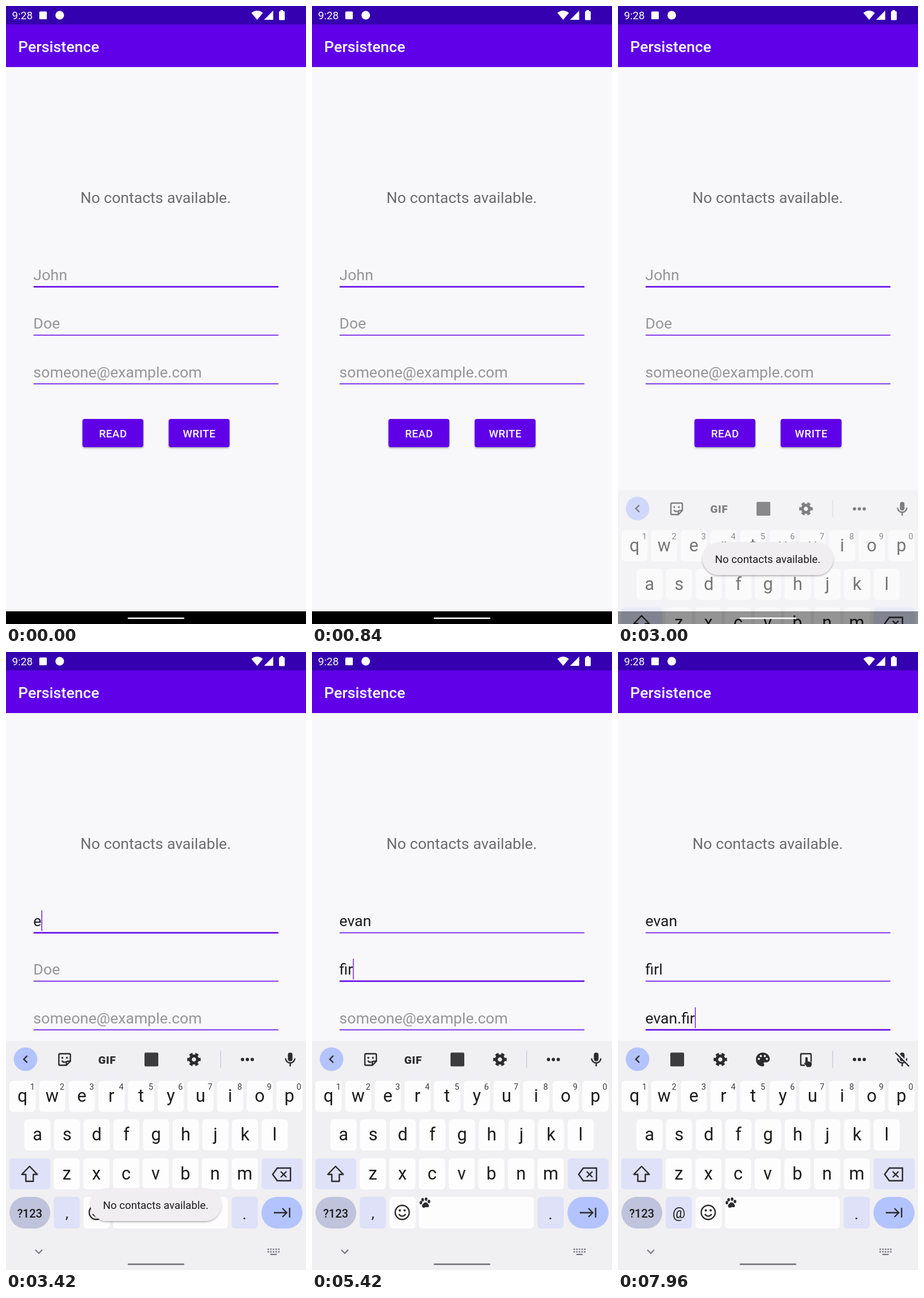
An HTML page that plays this animation: 522x1073 px, repeating every 8 s.

```html
<!DOCTYPE html>
<html lang="en">
<head>
<meta charset="utf-8">
<title>Contact form</title>
<style>
html, body { margin: 0; width: 100%; height: 100%; overflow: hidden; background: #f8f8fa; }
svg { display: block; width: 100%; height: 100%; font-family: Roboto, sans-serif; }
.ink { fill: none; stroke: #2b2b2e; stroke-width: 2.4; }
.solid { fill: #2b2b2e; }
</style>
</head>
<body>
<script>
const PURPLE = '#5f00e8', DARK = '#1b1b1d', KEY = '#fdfdfd', FUNC = '#dee1f8', BLUE = '#b3c3fd';
const HANDLE = 'M213 1063H309';

const rect = (x, y, w, h, r, fill, extra = '') =>
  `<rect x="${x}" y="${y}" width="${w}" height="${h}" rx="${r}" fill="${fill}" ${extra}/>`;
const circle = (x, y, r, fill) => `<circle cx="${x}" cy="${y}" r="${r}" fill="${fill}"/>`;
const text = (x, y, size, fill, str, extra = '') =>
  `<text x="${x}" y="${y}" font-size="${size}" fill="${fill}" ${extra}>${str}</text>`;
const mid = (x, y, size, fill, str, extra = '') =>
  text(x, y, size, fill, str, 'text-anchor="middle" ' + extra);
const ink = (d, extra = '') => `<path class="ink" d="${d}" ${extra}/>`;
const solid = (d, extra = '') => `<path class="solid" d="${d}" ${extra}/>`;
const at = (x, y, body) => `<g transform="translate(${x} ${y})">${body}</g>`;

// Form
const fields = [
  { y: 487.5, hint: 'John', value: 'evan', start: 3420, step: 190 },
  { y: 571.5, hint: 'Doe', value: 'firl', start: 4850, step: 220 },
  { y: 656, hint: 'someone@example.com', value: 'evan.firl', start: 6560, step: 190 }
];
const focusTimes = [0, 4300, 6050];

const button = (x, label, id) =>
  rect(x, 717, 106, 49, 4, PURPLE, 'filter="url(#low)"') +
  rect(x, 717, 106, 49, 4, '#000', `id="${id}" opacity="0"`) +
  mid(x + 53.3, 748.6, 18.6, '#fff', label, 'font-weight="500" letter-spacing=".45"');

const statusBar =
  rect(0, 0, 522, 32, 0, '#3500b0') +
  text(10.5, 23, 18.6, '#fff', '9:28') +
  rect(58, 9.5, 13, 13.5, 1.5, '#fff') + circle(93.5, 16, 7.5, '#fff') +
  `<path fill="#fff" d="M427 12Q437 4 447 12L437 24ZM449 24L465 8V24Z
    M475 10.500Q475 9 476.500 9H477.500V7H482V9H483.500Q485 9 485 10.500V23Q485 24.500 483.500 24.500H476.500Q475 24.500 475 23Z"/>`;

const form =
  rect(0, 32, 522, 74, 0, PURPLE) +
  text(21.3, 80, 26.6, '#fff', 'Persistence', 'font-weight="500"') +
  mid(260.5, 342.3, 26.6, '#6c6c6e', 'No contacts available.') +
  fields.map((f, i) =>
    text(47.6, f.y - 11.3, 26.5, '#959597', f.hint, `id="text${i}"`) +
    `<path id="line${i}" d="M48 ${f.y}H474" stroke="${PURPLE}"/>`).join('') +
  rect(0, 0, 1.3, 36, 0, PURPLE, 'id="caret"') +
  button(133, 'READ', 'press') + button(283, 'WRITE', 'idle');

// Keyboard icons, drawn around their own centre
const block = rect(-12, -12, 24, 24, 2, '#3c3c3f');
const gear =
  `<circle class="ink" r="6.200" stroke-width="5" style="stroke-width:5"/>
   <circle class="ink" r="9.500" pathLength="12" stroke-dasharray="1.100 .900" stroke-dashoffset=".550" style="stroke-width:4.500"/>`;
const mic = solid('M-4 -8A4 4 0 0 1 4 -8V-1A4 4 0 0 1 -4 -1Z') + ink('M-8 -2A8 8 0 0 0 8 -2M0 6V12');
const sticker =
  ink('M10 3V-8Q10 -10 8 -10H-8Q-10 -10 -10 -8V8Q-10 10 -8 10H3ZM3 10V5Q3 3 5 3H10M-5 2Q-2 6 2 4') +
  circle(-4, -3, 1.7, '#2b2b2e') + circle(4, -3, 1.7, '#2b2b2e');
const palette =
  solid('M0 -12C7 -12 12 -7 12 -1C12 3 9 5 5 5H3C1 5 1 7 2 8C3 10 2 12 0 12C-7 12 -12 7 -12 0C-12 -7 -7 -12 0 -12Z') +
  [[-7, -1], [-3.5, -6], [3.5, -6], [7, -1]].map(([x, y]) => circle(x, y, 1.9, '#f0eff2')).join('');
const touch =
  ink('M-2 10H-8Q-9 10 -9 8V-8Q-9 -10 -8 -10H8Q9 -10 9 -8V4') +
  solid('M-1 -3Q1 -5 3 -3V3L10 5V10L8 13H2L-4 6L-1 6Z');
const dots = [-8.5, 0, 8.5].map(x => circle(x, 0, 2.9, '#2b2b2e')).join('');

const tools = list => list.map(([x, icon]) => at(x, 707.5, icon)).join('');
const nameTools = tools([
  [102, sticker],
  [176, mid(0, 7, 19, '#2b2b2e', 'GIF', 'font-weight="900" letter-spacing=".6"')],
  [253, block], [327, gear], [494.5, mic]
]);
const mailTools = tools([
  [103, block], [178, gear], [252, palette], [327, touch],
  [494.5, mic + `<path d="M-10 -13L13 10" stroke="#f0eff2" stroke-width="3"/>` + ink('M-12 -12L12 12')]
]);

const letters = (row, x0, y) => [...row].map((c, i) => {
  const x = x0 + i * 51.6;
  return rect(x, y, 45.5, 54, 6, KEY) + mid(x + 22.7, y + 36.5, 30.5, DARK, c);
}).join('');

const paw = solid('M0 0Q4 -2 7 3Q10 8 5 8Q2 7 0 9Q-5 9 -4 4Z') +
  [[-6, 0], [-3, -5], [3, -6], [8, -2]].map(([x, y]) =>
    `<ellipse class="solid" cx="${x}" cy="${y}" rx="2.300" ry="3"/>`).join('');
const smiley =
  '<circle class="ink" r="12.200"/>' + ink('M-6 3Q0 10 6 3') +
  circle(-4.2, -3.5, 2, '#2b2b2e') + circle(4.2, -3.5, 2, '#2b2b2e');

const keyboard =
  rect(0, 675, 522, 398, 0, '#f0eff2') +
  circle(34, 707, 20.5, BLUE) + ink('M37 701L31 707L37 713') +
  `<g id="nameTools">${nameTools}</g><g id="mailTools">${mailTools}</g>` +
  '<path d="M373.500 692V722" stroke="#cbcbd0" stroke-width="1.300"/>' + at(420, 707.5, dots) +
  letters('qwertyuiop', 6, 744.5) +
  [...'1234567890'].map((d, i) => mid(46 + i * 51.5, 760, 14.5, '#3d3d40', d)).join('') +
  letters('asdfghjkl', 32, 811.5) +
  letters('zxcvbnm', 83, 879) +
  rect(6, 879, 71, 54, 6, FUNC) +
  ink('M41 893L27.500 907H34.500V919H47.500V907H54.500Z', 'stroke-linejoin="round"') +
  rect(445, 879, 71, 54, 6, FUNC) +
  ink('M464 907L472 896H495V918H472ZM478 902L488 912M488 902L478 912') +
  rect(6, 946, 71, 55, 27.5, '#bfc3db') +
  mid(41.3, 981.5, 20, DARK, '?123', 'font-weight="500"') +
  rect(83, 946, 45.5, 55, 6, FUNC) + mid(106, 983, 25, DARK, ',', 'id="extra"') +
  rect(135, 946, 45.5, 55, 6, KEY) + at(157, 973, smiley) +
  rect(186, 946, 200, 55, 6, KEY) + at(195.5, 956, paw) +
  rect(392.5, 946, 45.5, 55, 6, FUNC) + mid(415, 985, 28, DARK, '.') +
  rect(444.5, 946, 71.5, 55, 27.5, BLUE) +
  ink('M466 973.500H488M481 966L488.500 973.500L481 981M493.500 965V982') +
  '<path d="M51 1038L57 1044L63 1038" fill="none" stroke="#77777b" stroke-width="2"/>' +
  '<path d="M455 1037H476M455 1041.500H476" stroke="#77777b" stroke-width="2.600" stroke-dasharray="2.600 2"/>' +
  '<path d="M460 1046H471" stroke="#77777b" stroke-width="2.200"/>';

const toast = rect(147, 931, 227.5, 57, 28.5, '#f1eef1', 'filter="url(#low)"') +
  mid(260.5, 966.8, 18.65, DARK, 'No contacts available.');

document.body.innerHTML = `<svg viewBox="0 0 522 1073" preserveAspectRatio="none">
  <filter id="low" x="-10%" y="-20%" width="120%" height="150%">
    <feDropShadow dx="0" dy="1.800" stdDeviation="1.500" flood-opacity=".3"/>
  </filter>
  ${rect(0, 0, 522, 1073, 0, '#f8f8fa')}${statusBar}${form}
  ${rect(0, 1051, 522, 22, 0, '#000')}
  <g id="keyboard">${keyboard}</g>
  <g id="toast">${toast}</g>
  <path id="handle" d="${HANDLE}" stroke-width="2.600" stroke-linecap="round"/>
</svg>`;

const $ = id => document.getElementById(id);
const set = (id, attrs) => {
  for (const k in attrs) $(id).setAttribute(k, attrs[k]);
};
const ramp = (t, from, to) => Math.min(1, Math.max(0, (t - from) / (to - from)));

// Fast-out, slow-in: cubic-bezier(.4, 0, .2, 1)
function ease(p) {
  let lo = 0, hi = 1;
  for (let i = 0; i < 20; i++) {
    const s = (lo + hi) / 2, r = 1 - s;
    if (1.2 * r * r * s + .6 * r * s * s + s ** 3 < p) lo = s; else hi = s;
  }
  return 3 * (1 - lo) * lo * lo + lo ** 3;
}

function draw(t) {
  const focus = focusTimes.filter(s => t >= s).length - 1;
  let caret = false;
  fields.forEach((f, i) => {
    const n = Math.min(8, f.value.length, Math.max(0, Math.floor((t - f.start) / f.step) + 1));
    const typed = i < 2 ? f.value : f.value.slice(0, 8);
    const label = $('text' + i);
    label.textContent = n ? typed.slice(0, n) : f.hint;
    label.setAttribute('fill', n ? DARK : '#959597');
    set('line' + i, { 'stroke-width': i === focus ? 2.7 : 1.4 });
    const lastKey = f.start + (n - 1) * f.step;
    if (i === focus && n && t - lastKey < 500) {
      caret = true;
      set('caret', { x: 47.6 + label.getComputedTextLength(), y: f.y - 39 });
    }
  });
  set('caret', { opacity: +caret });

  set('press', { opacity: .15 * (ramp(t, 1480, 1580) - ramp(t, 1780, 1980)) });

  const shown = ramp(t, 1600, 1740) - ramp(t, 5120, 5260);
  const scale = .98 + .02 * shown;
  set('toast', {
    opacity: shown,
    transform: `translate(260.5 959.5) scale(${scale}) translate(-260.5 -959.5)`
  });

  const up = ease(ramp(t, 2891, 3176));
  set('keyboard', { opacity: up, transform: `translate(0 ${398 * (1 - up)})` });
  set('handle', { stroke: up > .9 ? '#6d6d70' : '#fff' });

  const mail = focus === 2;
  set('nameTools', { opacity: +!mail });
  set('mailTools', { opacity: +mail });
  $('extra').textContent = mail ? '@' : ',';
}

const t0 = performance.now();
function frame() {
  draw((performance.now() - t0) % 8000);
  requestAnimationFrame(frame);
}
frame();
</script>
</body>
</html>
```
